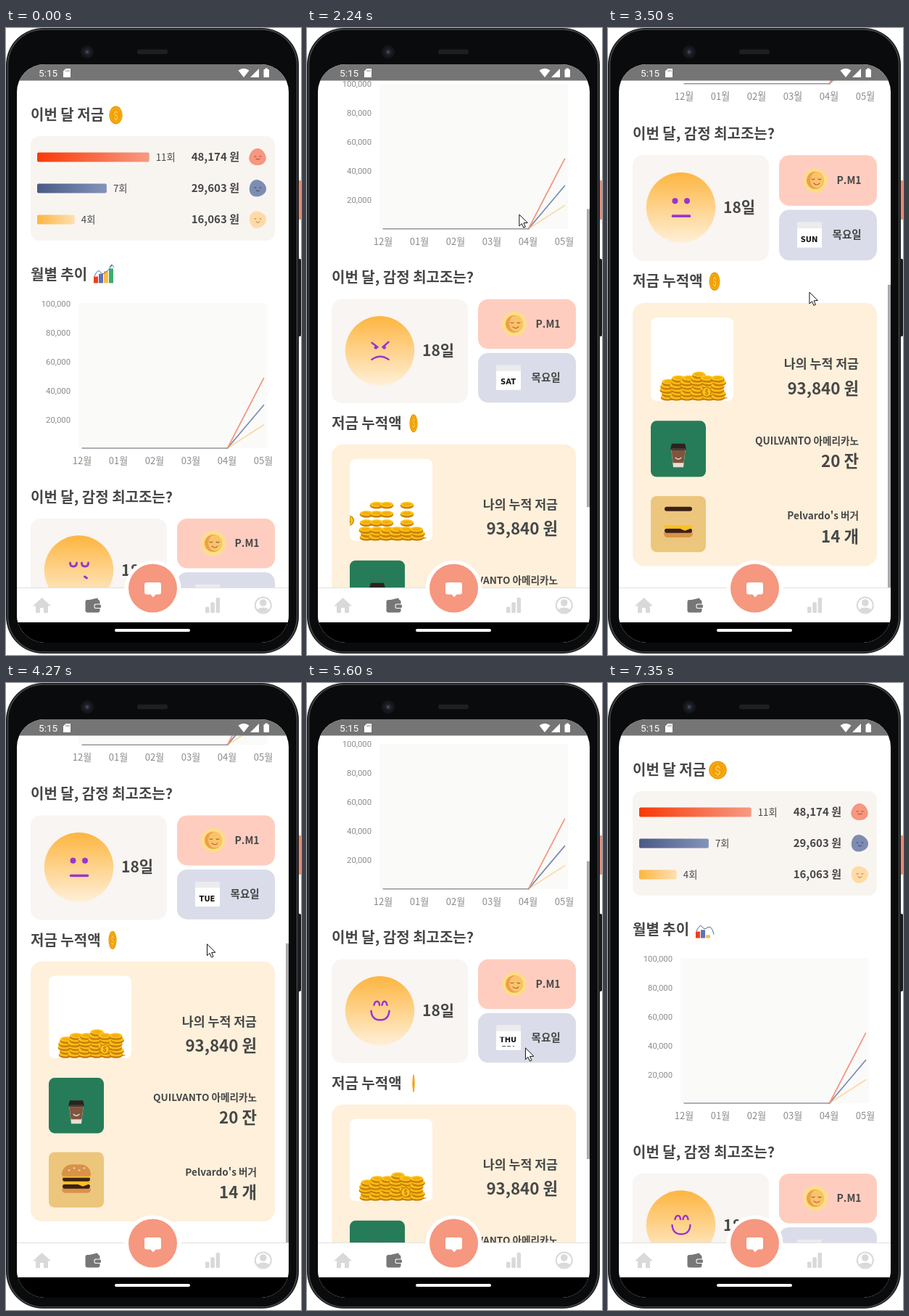
An HTML page with a canvas for the animation above (7.42 s loop, 407 px wide and 864 px high).

```html
<!DOCTYPE html>
<html lang="ko">
<head>
<meta charset="utf-8">
<title>Savings screen</title>
<style>
html, body { margin: 0; width: 100%; height: 100%; overflow: hidden; background: #fff; }
canvas { display: block; width: 407px; height: 864px; }
</style>
</head>
<body>
<canvas id="stage"></canvas>
<script>
const W = 407, H = 864, LOOP = 7420;
const TOP = 72, BOTTOM = 771, VIEW = BOTTOM - TOP, CONTENT = 1190;
const KR = '"Noto Sans CJK KR", "Noto Sans CJK JP", "Noto Sans CJK", sans-serif';
const LATIN = 'Roboto, sans-serif';
const INK = '#474747', CORAL = '#f6977f', NAVY = '#7d8db2', SAND = '#fedba6', PALE = '#d9d9d9';

const canvas = document.getElementById('stage');
const dpr = window.devicePixelRatio || 1;
canvas.width = W * dpr;
canvas.height = H * dpr;
const c = canvas.getContext('2d');

const clamp = v => Math.min(1, Math.max(0, v));
const ease = p => p * p * (3 - 2 * p);
const ramp = (t, from, to) => ease(clamp((t - from) / (to - from)));

// Two swipes down the page, one long pull back to its top
function gesture(t) {
  const first = 245 * ramp(t, 1455, 1850);
  const fling = 72 * ramp(t, 1850, 2400);
  const second = 174 * ramp(t, 2950, 3420);
  const back = 491 * ramp(t, 5250, 6060);
  const enter = ramp(t, 500, 1455);
  return {
    scroll: first + fling + second - back,
    endPull: .0165 * (ramp(t, 3400, 3500) - ramp(t, 4000, 4400)),
    startPull: .022 * (ramp(t, 6030, 6150) - ramp(t, 6280, 6560)),
    bar: ramp(t, 1400, 1460) - ramp(t, 4900, 5180) + ramp(t, 5250, 5300) - ramp(t, 6600, 6850),
    x: 404 - 66 * enter - 54 * ramp(t, 1455, 2500) - 7 * ramp(t, 2950, 3600) + 60 * ramp(t, 5250, 6060),
    y: 414 * enter - first + 187 * ramp(t, 2000, 2500) + 182 * ramp(t, 2730, 2950)
      - second - 57 * ramp(t, 4100, 5110) + back + 39 * ramp(t, 6060, 6160)
  };
}

function box(x, y, w, h, r, fill) {
  c.beginPath();
  c.roundRect(x, y, w, h, r);
  c.fillStyle = fill;
  c.fill();
}
function oval(x, y, rx, ry, fill) {
  c.beginPath();
  c.ellipse(x, y, rx, ry, 0, 0, 7);
  c.fillStyle = fill;
  c.fill();
}
const dot = (x, y, r, fill) => oval(x, y, r, r, fill);

function shape(d, fill) {
  c.fillStyle = fill;
  c.fill(new Path2D(d));
}
function stroke(d, color, width = 1) {
  c.strokeStyle = color;
  c.lineWidth = width;
  c.lineCap = c.lineJoin = 'round';
  c.stroke(new Path2D(d));
}
// Closed outline whose radius depends on the angle
function radial(x, y, steps, radius, fill) {
  c.beginPath();
  for (let i = 0; i < steps; i++) {
    const a = i * 2 * Math.PI / steps, r = radius(i, a);
    c.lineTo(x + r * Math.cos(a), y + r * Math.sin(a));
  }
  c.fillStyle = fill;
  c.fill();
}
function text(str, x, mid, size, { bold = true, align = 'left', color = INK, family = KR } = {}) {
  c.font = `${bold ? 700 : 400} ${size}px ${family}`;
  c.textAlign = align;
  c.fillStyle = color;
  c.fillText(str, x, mid + size * .36);
}
function blend(x0, y0, x1, y1, from, to) {
  const g = c.createLinearGradient(x0, y0, x1, y1);
  g.addColorStop(0, from);
  g.addColorStop(1, to);
  return g;
}
function at(x, y, sx, sy, draw) {
  c.save();
  c.translate(x, y);
  c.scale(sx, sy);
  draw();
  c.restore();
}
function clipped(x, y, w, h, r, draw) {
  c.save();
  c.beginPath();
  c.roundRect(x, y, w, h, r);
  c.clip();
  draw();
  c.restore();
}

function spinCoin(x, y, t) {
  const turn = Math.abs(Math.cos(Math.PI * (t - 280) / 1190));
  at(x, y, Math.max(turn, .12), 1, () => {
    dot(0, 0, 12.5, '#e89a06');
    dot(0, 0, 11, '#f8ab10');
    dot(0, 0, 9, '#f0a008');
    text('$', 0, 0, 16, { bold: false, align: 'center', color: '#ffd257', family: LATIN });
  });
}

const savers = [
  { times: 11, sum: 48174, color: CORAL, from: '#f83a08', to: '#f79a84', ink: '#a5423a', smile: 1 },
  { times: 7, sum: 29603, color: NAVY, from: '#4b5a86', to: '#8393b9', ink: '#35426e', smile: 3 },
  { times: 4, sum: 16063, color: SAND, from: '#fdb641', to: '#fee0b2', ink: '#b5743a', smile: 4 }
];

function savings(t) {
  text('이번 달 저금', 34, 120, 20);
  spinCoin(151.5, 120, t);
  box(34, 149, 337, 144, 12, '#f8f5f1');
  savers.forEach((s, i) => {
    const y = 178 + 43 * i, w = 14.7 * s.times - 7;
    box(43, y - 6.5, w, 13, 2, blend(43, 0, 43 + w, 0, s.from, s.to));
    text(s.times + '회', 52 + w, y, 13.3, { bold: false });
    text(s.sum.toLocaleString('en-US') + ' 원', 322, y, 15, { align: 'right' });
    radial(347, y, 60, (_, a) => 11.6 + .5 * Math.sin(a * 3 + i), s.color);
    at(347, y, 1, 1, () => stroke(`M-4-1h2M3-1h2M-2 2.500q2.500 ${s.smile} 5 0`, s.ink));
  });
}

function barsIcon(t) {
  const p = (t - 6140 + 7 * 960) / 960 % 1;
  ['#f23d16', '#5a74b4', '#fdbb4c', '#3aae6c'].forEach((color, i) => {
    const grow = i ? clamp((p - .14 - .05 * i) / .08) : clamp(p / .2);
    const tall = (9 + 3.7 * i) * grow;
    if (tall) box(121 + 7 * i, 351.5 - tall, 6, tall, 0, color);
  });
  const lift = clamp((p - .28) / .14);
  clipped(120, 322, 32 * clamp((p - .04) / .14), 32, 0, () => {
    const end = 346 - 19 * lift;
    stroke(`M122 342Q127 331 130 336T137 337Q143 333 146 ${end}`, '#55649c');
    if (lift === 1) stroke('M143 329l3-3 2.600 3.400', '#55649c');
  });
}

function trend(t) {
  text('월별 추이', 34, 340, 20);
  barsIcon(t);
  box(100, 379, 260, 200, 0, '#fafaf9');
  const soft = { bold: false, color: '#8a8a8a' };
  for (let i = 0; i < 5; i++) {
    text(100 - 20 * i + ',000', 89, 379.5 + 40 * i, 11.3, { ...soft, align: 'right', family: LATIN });
  }
  for (let i = 0; i < 6; i++) {
    const month = String((i + 11) % 12 + 1).padStart(2, '0');
    text(month + '월', 105 + 50 * i, 596.5, 13, { ...soft, align: 'center' });
  }
  [...savers].reverse().forEach(s =>
    stroke(`M305.500 579L355.500 ${579 - s.sum / 500}`, s.color, 1.8));
  stroke('M105 579H305.500', '#98939f', 1.5);
}

const moods = {
  kiss: { since: 0, d: 'M-12-10q0 5 4.500 5t4.500-5M4-10q0 5 4.500 5t4.500-5M8 9l3 2' },
  woozy: { since: 800, d: 'M-13 13c2-8 8-6 12-1s10 6 14 0', eye: 3.4 },
  angry: { since: 2100, d: 'M-11-11l8 6M12-12l-8 7M-11 12q11.500-8 23 0', eye: 2.4 },
  calm: { since: 3100, d: 'M-11 11.500H12', eye: 4 },
  happy: { since: 4300, d: 'M-8-8q1-5 4-5t3.500 5M3-8q1-5 3.500-5t3.500 5M-12 0q1 12.500 12.500 12.500T13 0' }
};

function mood(x, y, t) {
  dot(x, y, 47.7, blend(0, y - 48, 0, y + 48, '#fdb540', '#fff0d8'));
  const [kind, m] = Object.entries(moods).filter(e => e[1].since <= t).pop();
  const grow = m.since ? .5 + .5 * ramp(t, m.since, m.since + 140) : 1;
  const ink = '#9a35cf';
  at(x, y, grow, grow, () => {
    stroke(m.d, ink, kind === 'calm' ? 3.6 : kind === 'kiss' ? 3 : 2.5);
    if (!m.eye) return;
    const gap = kind === 'calm' ? 8 : 5.5, tall = kind === 'woozy' ? 1.4 : 1;
    const drop = kind === 'angry' ? -4.5 : -9;
    oval(-gap, drop, m.eye, m.eye * tall, ink);
    oval(gap + .5, drop, m.eye, m.eye * tall, ink);
  });
}

function sun(x, y, t) {
  at(x, y, 1, 1, () => {
    dot(0, 0, 16 + Math.cos(t / 390), 'rgba(253,229,140,.55)');
    const spin = t / 2400;
    c.save();
    c.rotate(spin);
    radial(0, 0, 28, i => i % 2 ? 14 : 18, '#fbe07c');
    c.restore();
    dot(0, 0, 12, '#ee9f4e');
    oval(2.5, -.5, 9.5, 11, '#fac36b');
    stroke('M-5-2q2 2 4 0M4-2q2 2 4 0M-2 4q4.500 4 8 0', '#a8632f', 1.1);
  });
}

const days = ['SUN', 'MON', 'TUE', 'WED', 'THU', 'FRI', 'SAT', ''];

function calendar(x, y, t) {
  const pos = 12.5 + (t - 1540) / 510;
  const i = Math.floor(pos);
  const shift = ramp(pos - i, .36, .64);
  const near = Math.round(i + shift) % 8;
  box(x, y, 34, days[near] ? 34 : 26, 0, '#fff');
  if (days[near]) box(x, y, 34, 8, 0, '#ececee');
  clipped(x, y + 16, 34, 13, 0, () => {
    for (let k = 0; k < 2; k++) {
      text(days[(i + k) % 8], x + 16.5, y + 23 + 13 * (k - shift), 10,
        { align: 'center', color: '#111', family: '"DejaVu Sans", sans-serif' });
    }
  });
}

function feelings(t) {
  text('이번 달, 감정 최고조는?', 34, 646.5, 20);
  box(34, 676, 188, 143, 14, '#f8f5f2');
  mood(100.5, 747, t);
  text('18일', 159, 747, 21);
  box(236, 676, 135, 68.5, 14, '#fecdc0');
  sun(286, 710, t);
  text('P.M1', 315.5, 710, 14);
  box(236, 750, 135, 68.5, 14, '#dadde9');
  calendar(261, 767, t);
  text('목요일', 309.5, 784, 14.6);
}

function flatCoin(x, y) {
  oval(x, y + 1.8, 9.3, 4.2, '#c97f08');
  oval(x, y, 9, 3.6, '#fdc41c');
  oval(x, y, 6, 2, '#f5ae0a');
}

function coinPile(t) {
  box(59, 896, 114, 113, 8, '#fff');
  clipped(59, 896, 114, 113, 8, () => {
    oval(119, 1005, 46, 3, '#e3a52a');
    for (let i = 0; i < 6; i++) {
      const late = i === 3 || i === 5;
      const count = Math.round(6.8 - Math.abs(i - 3) / 2);
      for (let j = 0; j < count; j++) {
        const wait = (late && j > 2 ? 2810 : 2100) + 60 * j - t;
        const sway = wait > 0 ? 0 : 1.6 * Math.sin(i * 5 + j * 2);
        if (wait < 480) flatCoin(82 + 14 * i + sway, 1003 - 5 * j - Math.max(0, wait) * .12);
      }
    }
    const roll = ramp(t, 2650, 3250);
    const x = 58 + 78 * roll, y = 981 + 16 * roll;
    dot(x, y, 7, '#c97f08');
    dot(x, y, 5.8, '#fdc41c');
    text('$', x, y, 9, { align: 'center', color: '#b87205', family: LATIN });
  });
}

function cup(t) {
  box(59, 1036, 76, 76, 8, '#267c58');
  at(97, 1083, 1, 1, () => {
    c.globalAlpha = .7 * clamp(Math.sin((t - 4400) / 450));
    stroke('M-6-19q3-3 0-6M1-18q4-3 0-7M6-20q4-2 1-6', '#4b6158', 1.2);
    c.globalAlpha = 1;
    shape('M-10-10H10L7 16H-7Z', '#e9ddd2');
    shape('M-9.500-7H9.500L7.500 10H-7.500Z', '#80543f');
    shape('M-9-16H9L11-9H-11Z', '#2a2320');
    box(-10.5, -10, 21, 3, 1, '#4a3a32');
    stroke('M-4 3q4 4 8 0', '#f3e4d6', 1.2);
  });
}

function burger(t) {
  const layer = (land, draw) => {
    const wait = land - t;
    if (wait < 380) at(97, 1177 - Math.max(0, wait) * .13, 1, 1, draw);
  };
  box(59, 1138, 76, 76, 8, '#ecc67c');
  clipped(59, 1138, 76, 76, 8, () => {
    layer(3000, () => box(-20, 10, 40, 7, [2, 2, 5, 5], '#d9934a'));
    layer(3200, () => {
      box(-19, 5, 38, 6, 3, '#3a2115');
      shape('M-20 1H20L17 5 9 8 2 5H-17Z', '#fdbf1e');
    });
    layer(3650, () => box(-19, -5, 38, 6, 3, '#3a2115'));
    layer(3900, () => {
      box(-20, -7, 40, 3, 1.5, '#f6c02a');
      box(-20, -22, 40, 16, [18, 18, 3, 3], '#d8924a');
      for (let i = 0; i < 4; i++) oval(-10 + 7 * i, -14 - 3 * (i % 2), 1.5, 1, '#f6dca6');
    });
  });
}

function total(t) {
  text('저금 누적액', 34, 847, 20);
  spinCoin(147, 847, t);
  box(34, 876, 337, 357, 16, '#fef0db');
  coinPile(t);
  cup(t);
  burger(t);
  const pair = (label, size, y, sum, gap) => {
    text(label, 346, y, size, { align: 'right' });
    text(sum, 346, y + gap, 22.3, { align: 'right' });
  };
  pair('나의 누적 저금', 17.3, 959, '93,840 원', 33);
  pair('QUILVANTO 아메리카노', 13.6, 1063, '20 잔', 27.5);
  pair("Pelvardo's 버거", 13.6, 1165, '14 개', 28);
}

function page(t, g) {
  const anchor = g.endPull > 0 ? BOTTOM : TOP;
  clipped(15, TOP, 375, VIEW, 0, () => {
    c.translate(0, anchor);
    c.scale(1, 1 + g.endPull + g.startPull);
    c.translate(0, -anchor);
    at(0, -g.scroll, 1, 1, () => {
      savings(t);
      trend(t);
      feelings(t);
      total(t);
    });
    const ratio = VIEW / CONTENT;
    c.globalAlpha = clamp(g.bar);
    box(386, TOP + g.scroll * ratio, 4, VIEW * ratio, 0, '#aaaaac');
  });
}

function phone() {
  box(401, 210, 6, 54, 1, '#e58c78');
  box(401, 318, 6, 107, 2, '#1a1a1c');
  box(0, 0, 404, 862, 51, '#1d1e20');
  box(2, 1.5, 400, 859, 49, '#4b4c4e');
  box(3.2, 2.7, 397.6, 856.6, 48, '#0a0b0c');
  dot(112, 33, 9, '#15171a');
  dot(112, 33, 5, '#1f242b');
  dot(112, 33, 2.2, '#3d4857');
  box(181, 29.5, 42, 6.5, 3, '#1e1f21');
}

function statusBar() {
  box(15, 50, 375, 22.5, 0, '#757575');
  text('5:15', 45, 62, 13.6, { bold: false, color: '#fff', family: LATIN });
  shape('M82.500 56H89V68H79V59.500Z', '#fff');
  stroke('M83 58v2M85 58v2M87 58v2', '#757575', .8);
  shape('M328 68L320.500 58.500Q328 53 335.500 58.500Z', '#fff');
  shape('M349 56V68H337Z', '#fff');
  box(355.5, 57, 7.5, 11, 1, '#fff');
  box(357.5, 55.5, 3.5, 2, 0, '#fff');
}

function nav() {
  box(15, BOTTOM, 375, 48, 0, '#fff');
  box(15, BOTTOM, 375, 1, 0, '#e0e0e0');
  dot(202.5, 772.5, 39, '#fff');
  dot(202.5, 772, 33.5, CORAL);
  box(191, 764, 23, 16.5, 3, '#fff');
  shape('M199 780h8l-4 4.500Z', '#fff');
  shape('M49.500 785L62 796.500H58V806H52V799H47V806H41V796.500H37Z', PALE);
  shape('M111 789L126 785.500 128 789Z', '#777');
  box(109.5, 788, 20, 17.5, 3, '#777');
  box(121.5, 793.5, 9.5, 6.5, 2, '#fff');
  box(122.5, 794.5, 8.5, 4.5, 1.5, '#777');
  for (let i = 0; i < 3; i++) {
    const h = 8.5 + 6.2 * i;
    box(275 + 7.3 * i, 806 - h, 5.5, h, 1.5, PALE);
  }
  dot(354.8, 795.5, 12, PALE);
  dot(354.8, 795.5, 10, '#fff');
  dot(354.8, 792, 4.8, PALE);
  clipped(344.8, 785.5, 20, 20, 10, () => oval(354.8, 804, 9, 5.5, PALE));
  box(15, 819, 375, 40, 0, '#000');
  box(150, 828, 104, 4, 2, '#fff');
}

function arrow(t, g) {
  if (t < 500 || t > 6800) return;
  at(g.x, g.y, 1, 1, () => {
    const d = 'M.5.5V16L4 12.700 6.500 18.300 9 17.200 6.600 11.800 11.500 11.500Z';
    shape(d, '#fff');
    stroke(d, '#111');
  });
}

function draw(t) {
  const g = gesture(t);
  c.setTransform(dpr, 0, 0, dpr, 0, 0);
  c.fillStyle = '#fff';
  c.fillRect(0, 0, W, H);
  phone();
  clipped(15, 50, 375, 797, 38, () => {
    box(15, 50, 375, 797, 0, '#fff');
    page(t, g);
    statusBar();
    nav();
  });
  arrow(t, g);
}

let begin;
function tick(now) {
  begin ??= now;
  draw((now - begin) % LOOP);
  requestAnimationFrame(tick);
}
requestAnimationFrame(tick);
</script>
</body>
</html>
```
